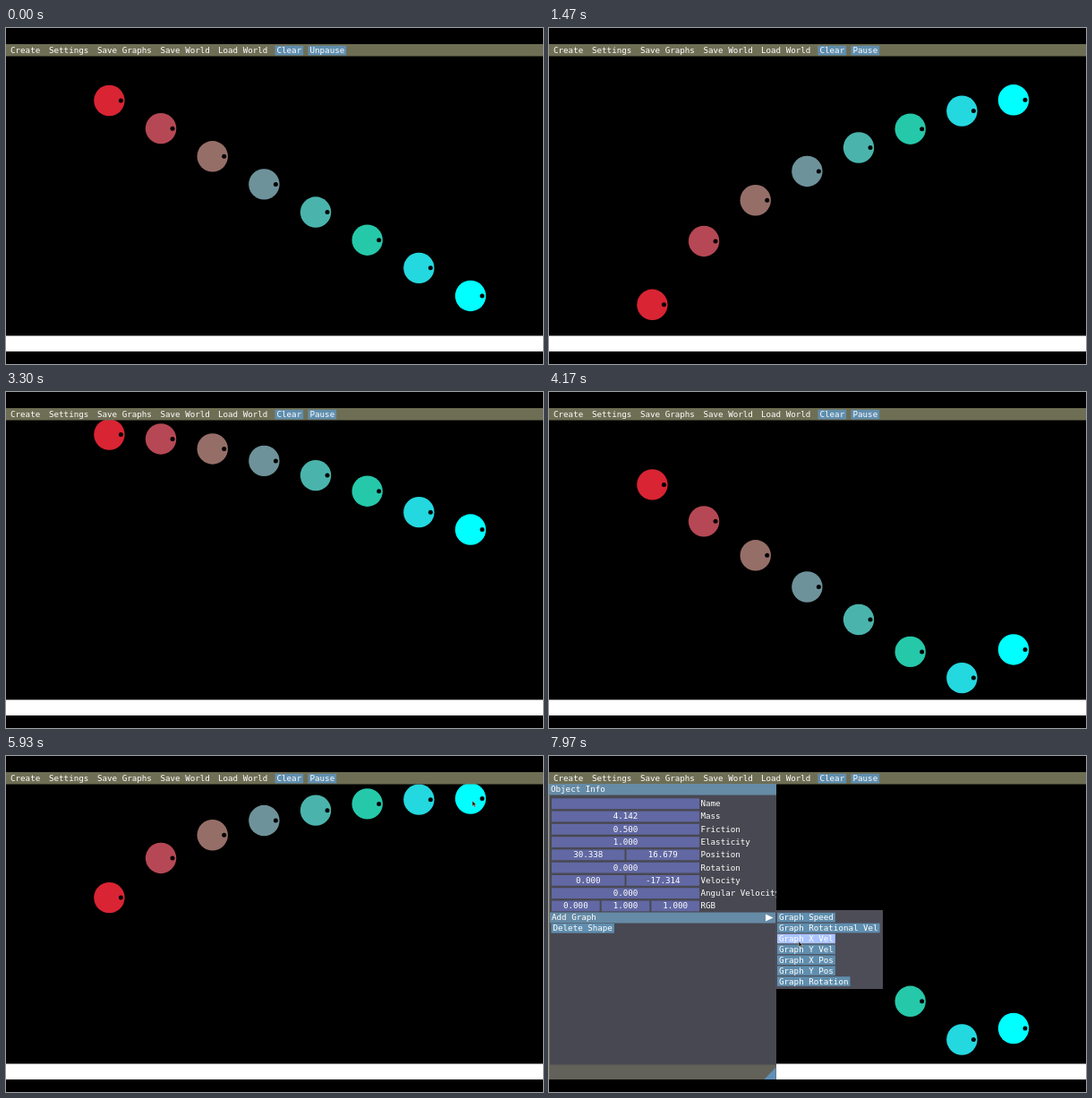
Animation of 600 by 375 pixels, one loop 8 s. Source, as an HTML page with a canvas:

```html
<!DOCTYPE html>
<html lang="en">
<head>
<meta charset="utf-8">
<title>Bouncing balls</title>
<style>
  html, body { margin: 0; height: 100%; overflow: hidden; background: #000; }
  canvas { display: block; width: 600px; height: 375px; }
</style>
</head>
<body>
<canvas id="stage" width="600" height="375"></canvas>
<script>
const ctx = document.getElementById('stage').getContext('2d');
const LOOP = 8;

// Elastic bounce between a common apex and the floor (pixels, seconds)
const APEX_Y = 47.5, FLOOR_Y = 326.5, PERIOD = 3.815;
const GRAVITY = 8 * (FLOOR_Y - APEX_Y) / PERIOD ** 2;
const RADIUS = 17.2, UNPAUSE_AT = 0.146;
const PANEL_AT = 5.95, PANEL_LAG = 0.045, SUBMENU_AT = 6.95;

const BALLS = [
  ['#d92433', 3.317], ['#b54854', 3.047], ['#966e68', 2.845], ['#6e929a', 2.682],
  ['#4ab4ac', 2.53], ['#26c8aa', 2.393], ['#24d8e0', 2.238], ['#00ffff', 2.125]
].map(([color, apexTime], i) => ({ color, apexTime, x: 115.4 + 57.66 * i, startY: 81 + 31.14 * i }));

const MENU = [['Create', 5], ['Settings', 48], ['Save Graphs', 102], ['Save World', 172.5], ['Load World', 237]];
const GRAPHS = ['Speed', 'Rotational Vel', 'X Vel', 'Y Vel', 'X Pos', 'Y Pos', 'Rotation'];

// time, x, y
const CURSOR_PATH = [
  [5.1, 602, 84], [5.27, 574, 77], [5.85, 521, 50], [6, 521, 50], [6.7, 193, 179],
  [7, 193, 179], [7.4, 262, 183], [7.6, 272, 196], [7.8, 279, 207], [8, 279, 207]
];

function rect(x, y, w, h, color) {
  ctx.fillStyle = color;
  ctx.fillRect(x, y, w, h);
}

function text(str, x, y, align = 'left') {
  ctx.fillStyle = '#fff';
  ctx.textAlign = align;
  ctx.fillText(str, x, y);
}

function disc(x, y, r, color) {
  ctx.fillStyle = color;
  ctx.beginPath();
  ctx.arc(x, y, r, 0, Math.PI * 2);
  ctx.fill();
}

function polygon(points, color) {
  ctx.fillStyle = color;
  ctx.beginPath();
  points.forEach(([x, y]) => ctx.lineTo(x, y));
  ctx.closePath();
  ctx.fill();
}

function button(label, x, y, color = '#608eae') {
  rect(x, y, ctx.measureText(label).width + 4, 10.6, color);
  text(label, x + 2, y + 8.3);
}

function simTime(t) {
  return t < PANEL_AT ? t : Math.max(PANEL_AT, t - PANEL_LAG);
}

function ballState(ball, t) {
  if (t < UNPAUSE_AT) return { y: ball.startY, v: 0 };
  const sinceApex = simTime(t) - ball.apexTime;
  const tau = sinceApex - PERIOD * Math.round(sinceApex / PERIOD);
  return { y: APEX_Y + GRAVITY * tau * tau / 2, v: GRAVITY * tau };
}

function cursorAt(t) {
  const next = CURSOR_PATH.findIndex(p => p[0] > t);
  if (next < 1) return null;
  const [t0, x0, y0] = CURSOR_PATH[next - 1], [t1, x1, y1] = CURSOR_PATH[next];
  const p = (t - t0) / (t1 - t0), e = p * p * (3 - 2 * p);
  return { x: x0 + (x1 - x0) * e, y: y0 + (y1 - y0) * e };
}

function drawWorld(t) {
  rect(0, 0, 600, 375, '#000');
  rect(0, 343.5, 600, 17.5, '#fff');
  for (const ball of BALLS) {
    const { y } = ballState(ball, t);
    disc(ball.x, y, RADIUS, ball.color);
    disc(ball.x + 13, y, 2.5, '#000');
  }
}

function drawMenu(t) {
  rect(0, 18, 600, 13.5, '#6e6e55');
  MENU.forEach(([label, x]) => text(label, x, 28));
  button('Clear', 300.5, 19.8);
  button(t < UNPAUSE_AT ? 'Unpause' : 'Pause', 337.5, 19.8);
}

function drawFields(values, label, row) {
  const y = 47.3 + 14.28 * row, gap = 2, n = values.length;
  const w = (165 - gap * (n - 1)) / n;
  values.forEach((value, i) => {
    const x = 3 + i * (w + gap);
    rect(x, y, w, 11.8, '#6168a3');
    text(value, x + w / 2, y + 8.9, 'center');
  });
  text(label, 169.5, y + 8.9);
}

function drawPanel(t, cursor) {
  const last = BALLS[BALLS.length - 1], { y, v } = ballState(last, t);
  const fixed = n => n.toFixed(3);
  const rows = [
    ['Name', ''], ['Mass', '4.142'], ['Friction', '0.500'], ['Elasticity', '1.000'],
    ['Position', '30.338', fixed((y - 18.8) / 17.1)], ['Rotation', '0.000'],
    ['Velocity', '0.000', fixed(v / 16.2)], ['Angular Velocity', '0.000'],
    ['RGB', '0.000', '1.000', '1.000']
  ];
  ctx.save();
  ctx.beginPath();
  ctx.rect(0, 31, 254, 330);
  ctx.clip();
  rect(0, 31, 254, 330, '#484852');
  rect(0, 31, 254, 12.5, '#668ba6');
  text('Object Info', 2, 40.3);
  rows.forEach(([label, ...values], i) => drawFields(values, label, i));

  const hovered = cursor.x < 253 && cursor.y > 174 && cursor.y < 187;
  rect(1, 174.5, 252, 12, hovered ? '#86b3fa' : '#668ba6');
  text('Add Graph', 3, 183.4);
  polygon([[242, 176.5], [250.5, 180.5], [242, 184.5]], '#fff');
  button('Delete Shape', 2.5, 187);
  rect(0, 344.5, 254, 16.5, '#62625a');
  rect(0, 43.5, 1, 317.5, '#6e6e55');
  polygon([[253.5, 347.5], [253.5, 361], [240.5, 361]], '#6090b8');
  ctx.restore();
}

function drawSubmenu(cursor) {
  rect(253, 172, 120, 88, '#4d4d58');
  GRAPHS.forEach((name, i) => {
    const y = 174.8 + 11.9 * i;
    const hovered = cursor.x > 254 && cursor.y >= y && cursor.y < y + 11.9;
    button('Graph ' + name, 255, y, hovered ? '#aac4ff' : '#608eae');
  });
}

function drawCursor({ x, y }) {
  const arrow = [[0, 0], [0, 6], [1.5, 4.8], [2.6, 7], [3.6, 6.5], [2.6, 4.4], [4.3, 4.2]];
  polygon(arrow.map(([dx, dy]) => [x + dx, y + dy]), '#111');
  ctx.strokeStyle = '#c8c8b0';
  ctx.lineWidth = 0.6;
  ctx.stroke();
}

function render(now) {
  const t = now / 1000 % LOOP, cursor = cursorAt(t);
  ctx.font = '9.2px "DejaVu Sans Mono", monospace';
  drawWorld(t);
  drawMenu(t);
  if (t >= PANEL_AT) drawPanel(t, cursor);
  if (t >= SUBMENU_AT) drawSubmenu(cursor);
  if (cursor) drawCursor(cursor);
}

const start = performance.now();
function tick() {
  render(performance.now() - start);
  requestAnimationFrame(tick);
}
tick();
</script>
</body>
</html>
```
